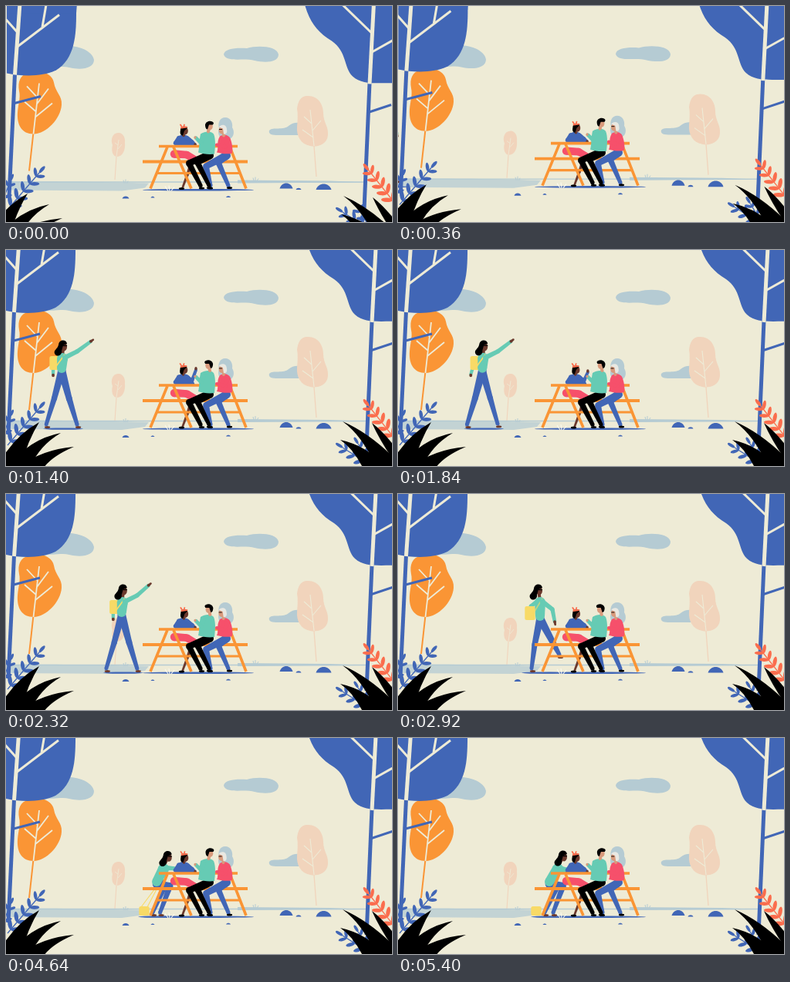
An HTML page with a canvas for the animation above (5.44 s loop, 500 px wide and 281 px high).

```html
<!DOCTYPE html>
<html lang="en">
<head>
<meta charset="utf-8">
<title>Picnic table</title>
<style>
html, body { margin: 0; width: 100%; height: 100%; overflow: hidden; background: #eeebd6; }
canvas { display: block; width: 100vw; height: 100vh; }
</style>
</head>
<body>
<canvas></canvas>
<script>
const LOOP = 5440, W = 500, H = 281;
const CREAM = '#eeebd6', BLUE = '#4166b6', ORANGE = '#fa9535', TEAL = '#66cbb4', CORAL = '#f6506b',
  MIST = '#b5cbd3', PEACH = '#f1d4bc', YELLOW = '#f8da66', RED = '#fb6d4d', SKIN = '#6b392d', TAN = '#d99a7c';
const canvas = document.querySelector('canvas'), g = canvas.getContext('2d');
const dpr = window.devicePixelRatio || 1;
canvas.width = W * dpr;
canvas.height = H * dpr;

const mix = (a, b, k) => a + (b - a) * k;
const ramp = (t, from, to) => {
  const k = Math.min(1, Math.max(0, (t - from) / (to - from)));
  return k * k * (3 - 2 * k);
};

function fill(color, d) {
  g.fillStyle = color;
  g.fill(new Path2D(d));
}
function line(color, width, d, cap = 'butt') {
  g.strokeStyle = color;
  g.lineWidth = width;
  g.lineCap = cap;
  g.lineJoin = 'round';
  g.stroke(new Path2D(d));
}
function oval(color, x, y, rx, ry, turn = 0) {
  g.fillStyle = color;
  g.beginPath();
  g.ellipse(x, y, rx, ry, turn, 0, 7);
  g.fill();
}
function placed(x, y, draw) {
  g.save();
  g.translate(x, y);
  draw();
  g.restore();
}

// Tapering chain of segments with round joints
function limb(color, r0, r1, ...pts) {
  const n = pts.length - 1, radius = i => mix(r0, r1, i / n);
  pts.forEach(([x, y], i) => {
    oval(color, x, y, radius(i), radius(i));
    if (i === n) return;
    const [u, v] = pts[i + 1], len = Math.hypot(u - x, v - y) || 1;
    const nx = (y - v) / len, ny = (u - x) / len, a = radius(i), b = radius(i + 1);
    g.beginPath();
    g.moveTo(x + nx * a, y + ny * a);
    g.lineTo(u + nx * b, v + ny * b);
    g.lineTo(u - nx * b, v - ny * b);
    g.lineTo(x - nx * a, y - ny * a);
    g.fill();
  });
}

function fern(color, x0, y0, x1, y1, pairs, size) {
  const turn = Math.atan2(y1 - y0, x1 - x0);
  line(color, 1.3, `M${x0} ${y0}L${x1} ${y1}`);
  const leaf = (x, y, a, s) =>
    oval(color, x + Math.cos(a) * s, y + Math.sin(a) * s, s, s * .38, a);
  for (let i = 0; i < pairs; i++) {
    const k = (i + .5) / pairs, s = size * (1 - k * .25);
    for (const side of [-.85, .85]) leaf(mix(x0, x1, k), mix(y0, y1, k), turn + side, s);
  }
  leaf(x1, y1, turn, size * .75);
}

function dome(x, y, rx, ry) {
  fill(BLUE, `M${x - rx} ${y}C${x - rx * .7} ${y - ry * 1.35} ${x + rx * .7} ${y - ry * 1.35} ${x + rx} ${y}Z`);
}
function shoe(x, y, dir = 1, color = SKIN) {
  oval(color, x + 1.5 * dir, y, 3.6, 1.5);
}

function clouds() {
  fill(MIST, 'M282 62C283 54 299 53 312 54C326 50 351 51 353 62C353 73 335 73 322 70C308 66 285 73 282 62Z');
  fill(MIST, 'M48 76C58 70 60 51 78 51C93 50 112 57 114 69C114 80 98 83 82 79C70 76 58 82 48 76Z');
  fill(MIST, 'M341 161C345 156 360 161 366 155C372 150 382 149 388 155V167H350C342 167 340 164 341 161Z');
}

function paleTrees() {
  fill(PEACH, 'M390 113C404 112 411 124 411 135C411 148 418 152 417 164C416 177 402 180 394 178C382 176 376 165 377 153C378 142 378 135 377 130C378 120 382 113 390 113Z');
  line(PEACH, 1.3, 'M399 178L402 218');
  line(CREAM, 1.1, 'M394 131L399 178M396 149L386 140M397 158L408 145M398 167L384 157');
  fill(PEACH, 'M145 161C151 160 155 167 154 174C155 183 151 192 144 192C138 192 136 184 138 177C135 170 138 161 145 161Z');
  line(PEACH, 1.1, 'M143 192L141 222');
  line(CREAM, .8, 'M146 170L143 192M145 177L141 174M145 182L150 176');
  fill(MIST, 'M284 141C291 141 294 148 293 154C297 160 295 170 285 170C277 170 273 162 276 155C274 148 277 141 284 141Z');
}

function path() {
  g.globalAlpha = .75;
  fill(MIST, 'M0 222C80 221 140 223 185 224L180 230L150 234L0 233Z');
  g.globalAlpha = 1;
  line(MIST, 1.4, 'M0 222.5C150 222 300 222.5 466 222.5');
  fill(MIST, 'M300 220L420 221L470 223L300 224Z');
  line(MIST, 1, 'M153 224L152 220M155 224V219M157 224L158 221M321 221L320 217M323 221V216M325 221L327 218');
}

function orangeTree() {
  fill(ORANGE, 'M30 80C45 75 60 82 62 93C64 106 73 110 72 122C71 140 52 160 36 160C20 160 14 148 15 132C16 120 19 113 17 104C15 92 18 83 30 80Z');
  line(ORANGE, 2, 'M35.5 158L30 208');
  line(CREAM, 1.8, 'M43 94L35.5 160M41 113L27 98M39 131L24 118M38 138L60 120M40 121L55 101');
}

function ground() {
  dome(155, 244, 4.5, 3);
  dome(190, 243, 2.5, 1.6);
  dome(288, 242.5, 3, 1.8);
  dome(363, 231, 8.5, 7);
  dome(379, 232.5, 3.5, 2.3);
  dome(411.5, 232.5, 10, 7.5);
  oval(BLUE, 249, 232.7, 72, 1.3);
}

// Joints: head, neck, hip, front arm, back arm, front leg, back leg, bag
const poses = [
  [2920, [182, 126, 184, 138, 184, 162, 200, 150, 203, 166, 172, 146, 169, 158, 201, 194, 209, 211, 177, 196, 173, 229, 171, 155]],
  [3420, [192, 142, 191, 152, 189, 179, 206, 162, 212, 173, 179, 165, 174, 180, 211, 196, 208, 228, 184, 202, 180, 229, 174, 203]],
  [3940, [203, 156, 200, 167, 193, 190, 215, 167, 226, 173, 187, 178, 181, 195, 210, 192, 197, 229, 202, 196, 190, 229, 180, 225]],
  [4360, [205, 156, 201, 167, 194, 190, 216, 168, 227, 173, 188, 178, 182, 196, 211, 192, 198, 229, 203, 196, 190, 229, 179, 225]],
  [4900, [214, 155, 207, 167, 196, 190, 217, 171, 229, 173, 206, 174, 219, 174, 214, 192, 201, 229, 206, 194, 190, 229, 179, 225]]
];

function walk(t) {
  const x = 72 + .0845 * (t - 1400), turn = Math.PI * (t - 2320) / 460;
  const bob = -Math.abs(Math.sin(turn)) * 1.2;
  const up = ramp(t, 450, 1020), wave = Math.sin(t / 95) * 2 * up;
  const leg = a => {
    const dx = 20 * Math.cos(a), lift = 6 * Math.max(0, -Math.sin(a));
    return [x + dx * .48 + lift * .7, 193 - lift * .5, x + dx, 229 - lift];
  };
  return [x + 2, 126 + bob, x + 1, 138 + bob, x, 157 + bob,
    mix(x + 10, x + 20, up), mix(150, 132, up), mix(x + 14, x + 36, up) + wave, mix(163, 119, up),
    x - 11, 148, x - 13 + 2 * Math.cos(turn), 162,
    ...leg(turn), ...leg(turn + Math.PI), x - 9, 147];
}

function poseAt(t) {
  let from = [2400, walk(Math.min(t, 2600))];
  for (const to of poses) {
    if (t < to[0]) {
      const k = ramp(t, from[0], to[0]);
      return from[1].map((v, i) => mix(v, to[1][i], k));
    }
    from = to;
  }
  return from[1];
}

function visitor(t) {
  const p = poseAt(t), pts = [];
  for (let i = 0; i < p.length; i += 2) pts.push([p[i], p[i + 1]]);
  const [head, neck, hip, elbowF, handF, elbowB, handB, kneeF, footF, kneeB, footB, bag] = pts;
  const seated = ramp(t, 3000, 3800), held = ramp(t, 2700, 3100) * (1 - ramp(t, 4360, 4700));

  oval(BLUE, hip[0] + 2, 232.6, 26, 1.2);
  limb(BLUE, 4.8, 2.4, hip, kneeB, [footB[0], footB[1] - 2]);
  shoe(footB[0], footB[1] + 1.5);
  limb(TEAL, 2.8, 2, [neck[0] - 4, neck[1] + 2], elbowB, handB);
  oval(SKIN, handB[0], handB[1] + 1, 1.9, 2.2);
  if (held > .02) {
    const [x, y] = bag;
    line(YELLOW, 1.1, `M${x - 4} ${y - 5}L${handB[0]} ${handB[1]}L${x + 4} ${y - 5}`);
  }
  const bw = 6.7, bh = mix(9, 6, seated);
  g.fillStyle = YELLOW;
  g.beginPath();
  g.roundRect(bag[0] - bw, bag[1] - bh, bw * 2, bh * 2, 2.5);
  g.fill();

  limb(BLUE, 5.3, 2.5, hip, kneeF, [footF[0], footF[1] - 2]);
  shoe(footF[0], footF[1] + 1.5);
  limb(SKIN, 2, 2, head, neck);
  limb(TEAL, 7, 6, [neck[0], neck[1] + 3], [hip[0], hip[1] - 3]);
  const strap = 1 - ramp(t, 2700, 3200);
  if (strap > .02) {
    g.globalAlpha = strap;
    line(YELLOW, 1.7, `M${neck[0] + 3} ${neck[1] - 2}L${bag[0] + 2} ${bag[1] + 4}`);
    g.globalAlpha = 1;
  }
  limb(TEAL, 3.2, 2.2, [neck[0] + 3, neck[1] + 2], elbowF, handF);
  const dx = handF[0] - elbowF[0], dy = handF[1] - elbowF[1], reach = Math.hypot(dx, dy) || 1;
  limb(SKIN, 1.8, 1.2, handF, [handF[0] + dx / reach * 4, handF[1] + dy / reach * 4]);

  placed(...head, () => {
    oval(SKIN, 1, 0, 4, 5.4);
    fill('#000', 'M5 -4C4 -10 -5 -10 -6 -3C-7 3 -13 4 -11 9C-8 14 -1 11 -2 5L0 -2Z');
    line('#000', 1.3, 'M0 -1.5H5');
  });
}

function sitterBehind(t) {
  const up = ramp(t, 980, 1300) * (1 - ramp(t, 1750, 2100)), nod = Math.sin(t / 330) * .5;
  limb(SKIN, 2.2, 1.3, [240, 198], [235, 213], [229, 229]);
  shoe(229, 231, -1, '#000');
  limb(CORAL, 5.2, 4.5, [218, 186], [234, 187], [246, 194]);
  fill(BLUE, 'M219 176C217 169 222 162 228 161C236 160 242 167 245 176Z');
  limb(BLUE, 2.7, 2, [224, 165], [219, 172], [229, 175]);
  const hand = [mix(245, 246, up), mix(174, 156, up)];
  limb(BLUE, 2.7, 1.9, [234, 165], [241, 170], hand);
  oval(SKIN, hand[0], hand[1] - 1.8 * up, 1.7, 2.3);
  placed(231 + nod, 156, () => {
    limb(SKIN, 1.8, 1.8, [-1, 2], [-1, 6]);
    oval(SKIN, 1, 0, 3.8, 5);
    fill('#000', 'M4 -4C1 -7 -5 -6 -5 -1C-6 3 -5 6 -2 6L0 0Z');
    line(RED, 1.8, 'M-4 -4L3 -5M-3 -5L-5 -8M-1 -5L0 -8', 'round');
  });
}

function table() {
  const bar = (w, d) => line(ORANGE, w, d);
  bar(3.6, 'M209 177L187 231M217 177L240 231M290 177L311 231');
  bar(3.2, 'M195 211H303');
  bar(3.6, 'M198 176H300');
  bar(3.8, 'M177 196H313');
}

function sittersFront(t) {
  const sway = Math.sin(t / 420) * .5;
  const looksLeft = t > 1050 && t < 3300;

  limb(BLUE, 5, 2.5, [286, 188], [275, 197], [288, 227]);
  limb(BLUE, 5.2, 2.5, [284, 189], [259, 202], [265, 227]);
  shoe(288, 230, 1, '#000');
  shoe(265, 230, -1, '#000');
  fill(CORAL, 'M277 163C282 160 289 161 291 167C293 173 294 179 293 185C286 187 278 185 273 184C276 178 272 171 277 163Z');
  limb(CORAL, 2.8, 2.1, [287, 166], [284, 177], [273, 174]);
  placed(280 + sway, 155, () => {
    limb(TAN, 1.9, 1.9, [2, 2], [2, 7]);
    oval(TAN, -.5, 0, 3.8, 5);
    fill('#e9e8e2', 'M-4 -4C-2 -8 6 -8 6 -1C7 3 5 6 2 5L1 -2Z');
    line('#000', .9, 'M-4 -1H0');
  });

  limb('#000', 5, 2.5, [264, 188], [248, 197], [263, 227]);
  limb('#000', 5.2, 2.6, [262, 188], [237, 198], [252, 227]);
  shoe(263, 230.5, 1, '#000');
  shoe(252, 230.5, 1, '#000');
  fill(TEAL, 'M252 160C258 156 266 156 269 160C272 167 271 178 270 186C263 187 255 186 249 184C251 176 250 169 252 160Z');
  limb(TEAL, 3.3, 2.2, [256, 162], [253, 172], [246, 165]);
  oval(TAN, 245, 164.5, 1.6, 1.8);
  placed(263 - sway, 150, () => {
    g.scale(looksLeft ? -1 : 1, 1);
    limb(TAN, 2, 2, [0, 2], [-1, 7]);
    oval(TAN, 1, 0, 3.8, 5);
    fill('#000', 'M6 -4C5 -8 -4 -8 -5 -2C-5 1 -4 4 -2 4L0 -2L5 -2Z');
  });
  line('#fbfaf0', 1.1, 'M210 234L206 228M212 234L211 227M214 234L218 229');
}

function leftTree() {
  line(BLUE, 5, 'M10.5 80L3 240');
  line(BLUE, 3, 'M10 118L44 109');
  fill(BLUE, 'M0 0H90C90 30 88 60 64 75C45 84 20 83 0 79Z');
  fill(BLUE, 'M0 -12H91L90 1H0Z');
  line(CREAM, 5, 'M17 -12L10.5 81');
  line(CREAM, 3, 'M13 45L68 3M46 19L51 -10M14 26L-2 8');
}

function rightTree() {
  line(BLUE, 5, 'M474 92L467 256');
  line(BLUE, 3, 'M472 131L502 121');
  fill(BLUE, 'M389 -12L393 0C400 18 409 28 425 38C445 52 440 72 452 84C465 96 485 92 508 93V-12Z');
  line(CREAM, 5, 'M479.5 -12L474 94');
  line(CREAM, 3, 'M438 -10L476 27M476 53L508 35');
}

function plants() {
  fern(BLUE, 2, 254, 43, 206, 5, 7.5);
  fern(BLUE, -6, 246, 6, 216, 2, 6);
  fern(RED, 504, 246, 470, 203, 5, 7.5);
  fern(BLUE, 478, 284, 436, 257, 4, 7);
  fern(BLUE, 474, 282, 456, 252, 3, 6.5);
}

function leftGrass() {
  fill('#000', 'M-8 276Q12 241 43 224Q28 248 18 285V310H-8Z');
  fill('#000', 'M4 281Q30 246 71 238Q44 254 32 281V310H4Z');
  fill('#000', 'M20 281Q45 260 88 256Q60 268 49 283V310H20Z');
}
function rightGrass() {
  fill('#000', 'M436 223Q473 239 508 276V310H490Q470 248 436 223Z');
  fill('#000', 'M474 225Q490 237 510 264V285Q486 252 474 225Z');
  fill('#000', 'M433 247Q466 254 491 281V310H473Q458 264 433 247Z');
}

function draw(t) {
  const drop = Math.pow(1 - Math.min(1, t / 1400), 3);
  const layer = (dx, dy, ...parts) =>
    placed(dx * drop, dy * drop, () => parts.forEach(part => part(t)));
  g.setTransform(canvas.width / W, 0, 0, canvas.height / H, 0, 0);
  g.fillStyle = CREAM;
  g.fillRect(0, 0, W, H);
  layer(0, 1, clouds);
  layer(0, 4, paleTrees);
  layer(0, 6.5, path, orangeTree, ground, visitor, sitterBehind, table, sittersFront);
  layer(1, 8.5, leftTree);
  layer(-3, 7.5, rightTree);
  layer(0, 11, plants);
  layer(-15, 20, leftGrass);
  layer(1, 24, rightGrass);
}

const start = performance.now();
function tick() {
  draw((performance.now() - start) % LOOP);
  requestAnimationFrame(tick);
}
tick();
</script>
</body>
</html>
```
